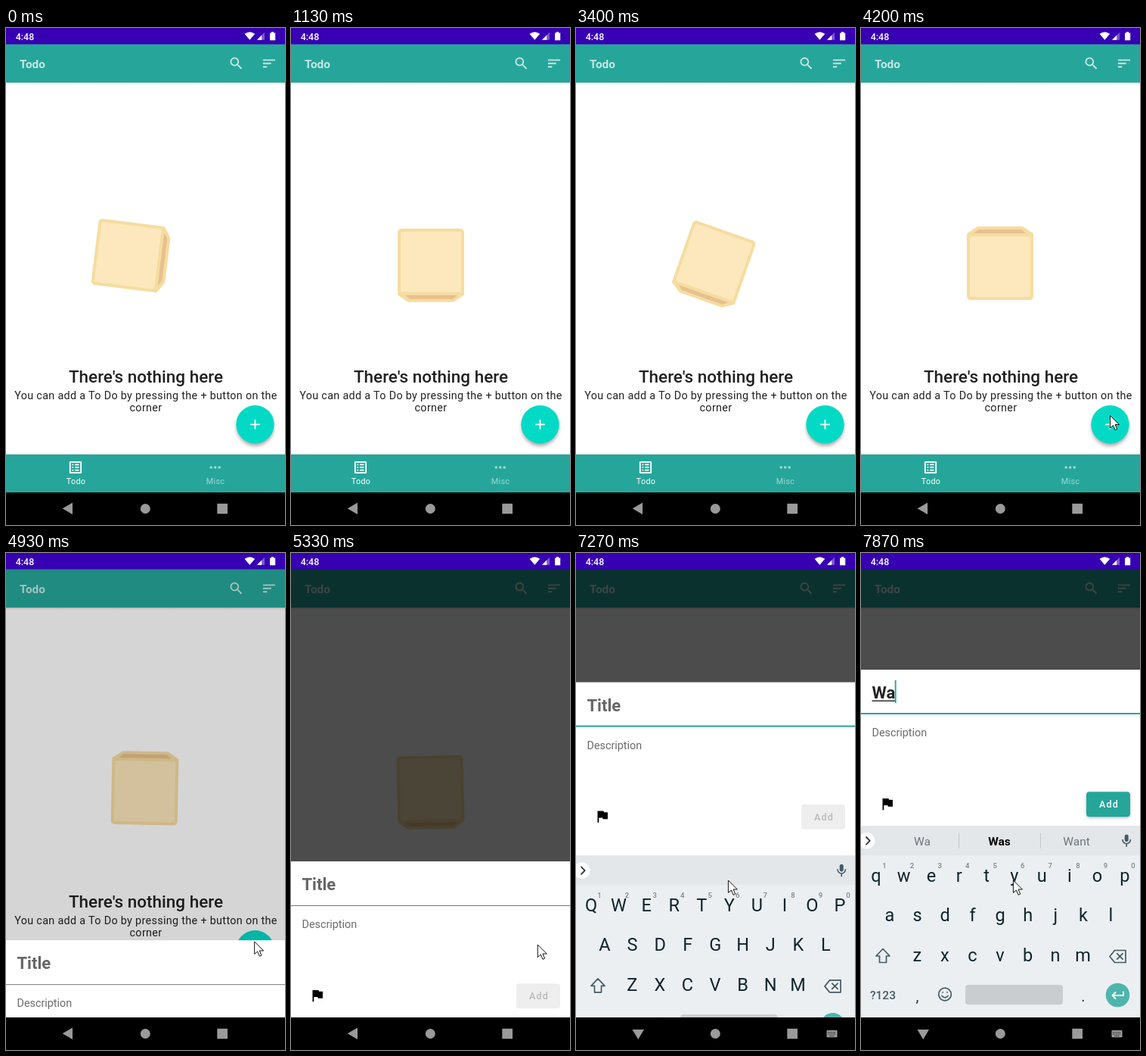
An HTML page that plays this animation: 369 by 656 pixels, repeating every 8 s.

```html
<!DOCTYPE html>
<html lang="en">
<head>
<meta charset="utf-8">
<title>Todo</title>
<style>
html, body { margin: 0; width: 100%; height: 100%; overflow: hidden; background: #fff; }
svg { display: block; width: 369px; height: 656px; font-family: Roboto, sans-serif; }
.mid { text-anchor: middle; }
.line { fill: none; stroke-linecap: round; stroke-linejoin: round; }
</style>
</head>
<body>
<svg viewBox="0 0 369 656">
  <defs>
    <filter id="soft" x="-30%" y="-30%" width="160%" height="170%"><feGaussianBlur stdDeviation="2.5"/></filter>
    <linearGradient id="fade" x2="0" y2="1"><stop stop-opacity=".16"/><stop offset="1" stop-opacity="0"/></linearGradient>
  </defs>

  <rect width="369" height="656" fill="#fff"/>
  <rect y="72" width="369" height="3" fill="url(#fade)"/>
  <rect y="21" width="369" height="51" fill="#26a69a"/>
  <g fill="#fff" fill-opacity=".74">
    <text x="18" y="53" font-size="15.3" font-weight="700">Todo</text>
    <path transform="translate(293.8 36) scale(.897)" d="M15.5 14h-.79l-.28-.27C15.41 12.59 16 11.11 16 9.5 16 5.91 13.09 3 9.5 3S3 5.91 3 9.5 5.91 16 9.5 16c1.61 0 3.09-.59 4.23-1.57l.27.28v.79l5 4.99L20.49 19l-4.99-5zm-6 0C7.01 14 5 11.99 5 9.5S7.01 5 9.5 5 14 7.01 14 9.5 11.99 14 9.5 14z"/>
    <path transform="translate(337.2 36) scale(.897)" d="M3 18h6v-2H3zM3 6v2h18V6zm0 7h12v-2H3z"/>
  </g>

  <g id="cube">
    <path fill="#f5dca0" d="M-38-48.5H38Q44-48.5 44-42.5V39L30 48.5H-30L-44 39V-42.5Q-44-48.5-38-48.5Z"/>
    <rect x="-40" y="-44.5" width="80" height="80" rx="2" fill="#fde7bc"/>
    <path fill="#e8c08f" d="M-34 39.5H35L29 44.5H-28Z"/>
    <g id="face" class="line" stroke="#ffa800" stroke-width="4">
      <path id="eyes"/>
      <path id="mouth" pathLength="1"/>
    </g>
  </g>

  <g class="mid" fill="#212121">
    <text x="185" y="468" font-size="22.5" font-weight="500">There's nothing here</text>
    <g font-size="14.35" letter-spacing=".33">
      <text x="185" y="489.5">You can add a To Do by pressing the + button on the</text>
      <text x="185" y="506.3">corner</text>
    </g>
  </g>

  <rect y="561.5" width="369" height="2" opacity=".12"/>
  <rect y="563" width="369" height="50" fill="#26a69a"/>
  <g class="mid" fill="#fff" font-size="10.8" letter-spacing=".3">
    <path transform="translate(81.2 569.2) scale(.897)" d="M19 5v14H5V5h14m1.1-2H3.9c-.5 0-.9.4-.9.9v16.2c0 .4.4.9.9.9h16.2c.4 0 .9-.5.9-.9V3.9c0-.5-.5-.9-.9-.9zM11 7h6v2h-6zm0 4h6v2h-6zm0 4h6v2h-6zM7 7h2v2H7zm0 4h2v2H7zm0 4h2v2H7z"/>
    <text x="92.5" y="602">Todo</text>
    <g opacity=".55">
      <circle cx="271.2" cy="580" r="1.8"/><circle cx="276.7" cy="580" r="1.8"/><circle cx="282.2" cy="580" r="1.8"/>
      <text x="277" y="602">Misc</text>
    </g>
  </g>
  <circle cx="329.5" cy="527" r="24.5" opacity=".35" filter="url(#soft)"/>
  <circle cx="329.5" cy="523.3" r="25.2" fill="#03dac5"/>
  <path d="M323.2 523.3h12.6M329.5 517v12.6" stroke="#fff" stroke-width="1.8"/>

  <rect id="scrim" y="21" width="369" height="592"/>

  <g id="sheet">
    <rect width="369" height="460" fill="#fff"/>
    <text id="title" x="14.5" y="38.3" font-size="22" font-weight="700"></text>
    <rect id="underline" x="14.5" y="40.5" height="1.4" fill="#212121"/>
    <rect id="caret" y="14" width="1.9" height="30" fill="#26a69a"/>
    <rect id="rule" width="369"/>
    <text x="14.5" y="88.3" font-size="14.35" fill="#6b6b6b">Description</text>
    <path transform="translate(24 166.4) scale(.897)" d="M14.4 6L14 4H5v17h2v-7h5.6l.4 2h7V6z"/>
    <rect id="addShadow" x="298.5" y="163" width="57" height="32" rx="4" opacity=".3" filter="url(#soft)"/>
    <rect id="addBox" x="298" y="161.3" width="58" height="33" rx="4"/>
    <text id="addText" x="315" y="182.3" font-size="12.56" font-weight="500" letter-spacing="1.12">Add</text>
  </g>

  <g id="board">
    <rect width="369" height="253" fill="#eceff1"/>
    <rect width="369" height="39" fill="#e4e7e9"/>
    <circle cx="7.5" cy="19.8" r="10.8" fill="#fff"/>
    <path class="line" d="M7 15l4.7 4.8L7 24.6" stroke="#263238" stroke-width="1.8"/>
    <g id="hints" class="mid" font-size="15.5">
      <text x="81" y="25.7" fill="#6b767b"></text>
      <text x="183" y="25.7" font-weight="700"></text>
      <text x="285" y="25.7" fill="#6b767b"></text>
      <path d="M129.5 9.5v20.5M237.5 9.5v20.5" stroke="#c3c8cb"/>
    </g>
    <rect x="348.7" y="11.5" width="5" height="9.6" rx="2.5" fill="#455a64"/>
    <path class="line" d="M346 18.5a5.2 5.2 0 0 0 10.4 0M351.2 24v3.3" stroke="#455a64" stroke-width="1.6"/>
    <g id="keys" class="mid" fill="#10242e"></g>
    <g class="line" stroke="#455a64" stroke-width="1.7">
      <path d="M29 162.5l9 9.5h-4.5v8.5h-9v-8.5H20Z"/>
      <path d="M335.5 164.5H350v16H335.5L329 172.5ZM338.7 168.7l7.4 7.4m0-7.4l-7.4 7.4"/>
      <circle cx="111" cy="222.5" r="8.3"/>
      <path d="M107 224.5q4 4.8 8 0M108 219.7v.2M114 219.7v.2"/>
    </g>
    <g class="mid" fill="#263238">
      <text x="29" y="228.5" font-size="15.5" font-weight="500" fill="#455a64">?123</text>
      <text x="74.5" y="231.5" font-size="20">,</text>
      <text x="294" y="231.5" font-size="20">.</text>
    </g>
    <rect x="138" y="210" width="129" height="26" rx="4" fill="#c9cdd0"/>
    <circle cx="339.5" cy="223.5" r="15.8" fill="#4db6ac"/>
    <path class="line" d="M347 219.5v4.5h-14.5m4-4l-4 4 4 4" stroke="#fff" stroke-width="1.8"/>
  </g>

  <rect width="369" height="21.5" fill="#3700b3"/>
  <g fill="#fff">
    <text x="12.8" y="16" font-size="12.4" font-weight="500">4:48</text>
    <path d="M322.3 15.7L315.6 7.7Q322.3 2.6 329.2 7.7Z"/>
    <path d="M332 15.8h10v-10z" opacity=".35"/>
    <path d="M332 15.8h6.2V9.6zM349 6.4h2v-1.4h3v1.4h2.2v9.8H349z"/>
  </g>

  <rect y="613" width="369" height="43"/>
  <g fill="#9a9a9a">
    <path id="back"/>
    <circle cx="184.3" cy="634.5" r="6.5"/>
    <rect x="279.3" y="627.8" width="13.7" height="13.4"/>
    <g id="switcher">
      <rect x="331.5" y="630" width="14" height="9.3" rx="1"/>
      <path d="M333 632.7h11M333 635h11M335.5 637.4h6" stroke="#000" stroke-dasharray="1.2 1"/>
    </g>
  </g>

  <path id="pointer" d="M0 0V16.5L4 13L6.7 19.3L9.3 18.1L6.6 12H12Z" fill="#fff" stroke="#111" stroke-linejoin="round"/>
</svg>
<script>
const $ = id => document.getElementById(id);
const set = (el, attrs) => { for (const k in attrs) el.setAttribute(k, attrs[k]); };
const part = (t, from, to) => Math.min(1, Math.max(0, (t - from) / (to - from)));
const mix = (a, b, p) => a + (b - a) * p;
const easeOut = p => 1 - (1 - p) ** 3;
const easeInOut = p => p < .5 ? 4 * p ** 3 : 1 - 4 * (1 - p) ** 3;
const move = (el, x, y, angle = 0) => set(el, { transform: `translate(${x} ${y}) rotate(${angle})` });
const show = (el, on) => set(el, { visibility: on ? 'visible' : 'hidden' });

const letters = [];
function addKey(x, y, char, size, fill) {
  const key = document.createElementNS('http://www.w3.org/2000/svg', 'text');
  set(key, { x, y, 'font-size': size, ...(fill && { fill, 'font-weight': 500 }) });
  key.textContent = char;
  $('keys').append(key);
  return key;
}
[['qwertyuiop', 20, 74], ['asdfghjkl', 38, 126], ['zxcvbnm', 74.3, 179]].forEach(([row, x0, y], r) =>
  [...row].forEach((char, i) => {
    const x = x0 + i * 36.55;
    letters.push([addKey(x, y, char, 23.5), char]);
    if (!r) addKey(x + 11, 55.5, (i + 1) % 10, 9.5, '#78858b');
  }));

const ROLL = 3230, REST = 3800, OPEN = 4870;

function bob(s) {
  return 312 + 4.5 * Math.cos(2 * Math.PI * Math.max(0, s - 850) / 1400);
}

function drawCube(t) {
  const s = t < OPEN ? t : t - 5139;      // time since the box was on its side
  let x = 185, y = bob(s), angle = 0;
  if (t >= ROLL && t < OPEN) {            // bottom edge goes to the top
    const e = easeInOut(part(t, ROLL, REST)), arc = Math.sin(Math.PI * e);
    x = mix(185, 184, e) - 11 * arc;
    y = mix(bob(ROLL), 310.5, e) + 8 * arc;
    angle = 180 * e;
  } else if (s < 257) {                   // and back down
    const e = easeInOut(part(s, -269, 257)), arc = Math.sin(Math.PI * e);
    x = mix(184, 185, e) - 19 * arc;
    y = mix(310.5, 316.5, e) - 13 * arc;
    angle = 180 + 180 * e;
  } else if (s < 850) {
    angle = Math.sin((s - 257) / 95) * (1 - part(s, 257, 850));
  }
  move($('cube'), x, y, angle);

  const p = Math.min(part(s, 1290, 1720), 1 - part(s, 2900, 3200));
  const drop = 9 * (1 - part(p, .2, 1)), m = part(p, .2, 1);
  const eye = 1 + 5 * m, mouthY = 10.5 + drop, lift = mouthY - 10 - 21 * m, c = 13 + 10 * m;
  show($('face'), p > 0);
  set($('eyes'), { d: `M-8.7 ${-22.5 + drop - eye / 2}v${eye}M9 ${-22.5 + drop - eye / 2}v${eye}` });
  set($('mouth'), {
    d: `M-23 ${mouthY}C${-c} ${lift} ${c + 1} ${lift} 24 ${mouthY}`,
    'stroke-dasharray': `${p} 2`
  });
}

function drawSheet(t) {
  const up = easeOut(part(t, OPEN, 5170)), lift = easeOut(part(t, 7080, 7400));
  const text = t >= 7800 ? 'Wa' : t >= 7670 ? 'W' : '';
  const focus = t >= 6380;
  set($('scrim'), { opacity: .7 * part(t, OPEN, 5130) });
  move($('sheet'), 0, 613 - 206 * up - 253 * lift);

  $('title').textContent = text || 'Title';
  set($('title'), { fill: text ? '#212121' : '#666' });
  const width = text ? $('title').getComputedTextLength() : 0;
  set($('underline'), { width });
  set($('caret'), { x: 14 + width });
  show($('caret'), focus && (text || Math.floor((t - 6380) / 500) % 2 === 0));
  set($('rule'), focus ? { y: 57, height: 2, fill: '#26a69a' } : { y: 58, height: 1, fill: '#777' });

  show($('addShadow'), text);
  set($('addBox'), { fill: text ? '#26a69a' : '#eee' });
  set($('addText'), { fill: text ? '#fff' : '#bababa' });

  move($('board'), 0, 613 - 253 * easeOut(part(t, 7100, 7470)));
  for (const [key, char] of letters) key.textContent = text ? char : char.toUpperCase();
  show($('hints'), text);
  [text, 'Was', 'Want'].forEach((word, i) => $('hints').children[i].textContent = word);

  const typing = t >= 7080;
  set($('back'), { d: typing ? 'M74.5 629H90L82.2 642Z' : 'M74.7 634.3L88 626.5V642Z' });
  show($('switcher'), typing);
}

function drawPointer(t) {
  const enter = easeOut(part(t, 3960, 4200)), nudge = part(t, OPEN, 5100), go = easeInOut(part(t, 5380, 6150));
  show($('pointer'), t >= 4000);
  move($('pointer'),
    mix(mix(mix(372, 329.5, enter), 326.3, nudge), 201.4, go),
    mix(mix(mix(531, 511.5, enter), 517, nudge), 432, go));
}

const start = performance.now();
function frame() {
  const t = (performance.now() - start) % 8000;
  drawCube(t);
  drawSheet(t);
  drawPointer(t);
  requestAnimationFrame(frame);
}
frame();
</script>
</body>
</html>
```
